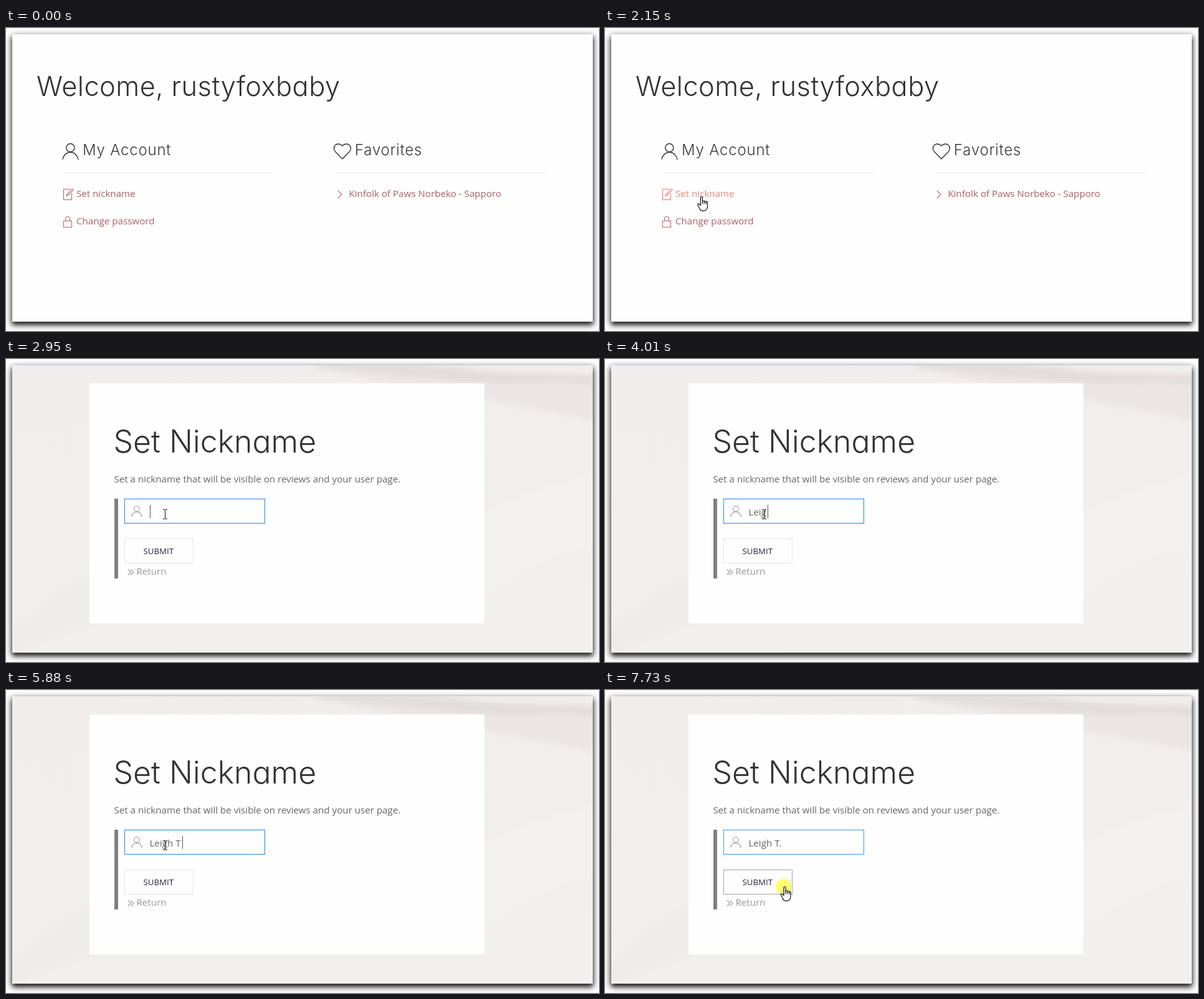
These frames come from a looping animation (952 by 486 pixels, 8000 ms). An HTML page:

```html
<!DOCTYPE html>
<html lang="en">
<head>
<meta charset="utf-8">
<title>Set nickname</title>
<style>
  html, body { margin: 0; width: 100%; height: 100%; overflow: hidden; background: #fff; }
  .frame {
    position: absolute; left: 10px; top: 10px; width: 932px; height: 461px; background: #fefefe;
    box-shadow: 0 4px 10px 1px rgba(0, 0, 0, .78), 0 5px 6px -1px rgba(0, 0, 0, .5);
  }
  svg { position: absolute; left: 0; top: 0; display: block; }
  text { font: 15.15px "Open Sans", "Noto Sans", sans-serif; fill: #666; white-space: pre; }
  .title {
    font: 300 50px Inter, sans-serif; font-optical-sizing: none;
    font-feature-settings: "cv11"; fill: #333;
  }
  .title.small { font-size: 43.5px; letter-spacing: .4px; }
  .section {
    font: 350 24px Inter, sans-serif; font-optical-sizing: none;
    letter-spacing: .8px; fill: #3a3a3a;
  }
  .icon { fill: none; stroke: #333; stroke-width: 1.1; }
  .big { stroke-width: .95; }
  .link text { fill: #a85f66; }
  .link .icon { stroke: #b8646c; }
  .link.hover text { fill: #ea8585; }
  .link.hover .icon { stroke: #ea7c7c; }
  .muted { fill: #999; }
  .icon.muted { fill: none; stroke: #999; }
  .rule { fill: #e5e5e5; }
  .box { fill: #fefefe; stroke: #e5e5e5; }
  .button { font-size: 13.3px; fill: #2b2535; }
</style>
</head>
<body>
<div class="frame"></div>
<svg width="952" height="486">
  <defs>
    <g id="user">
      <circle cx="9.9" cy="6.4" r="4.4"/>
      <path d="M1.5 19C2.3 14.5 5.8 11.2 10 11.2S17.7 14.6 18.5 19.2"/>
    </g>
    <path id="heart" d="M10 4S8.1 2 5.74 2 1 3.55 1 6.73c0 2.11 1.67 3.71 1.67 3.71L10 18l7.33-7.56S19 8.84 19 6.73C19 3.55 16.62 2 14.26 2S10 4 10 4Z"/>
    <path id="edit" d="M18.65 1.68a1.2 1.2 0 0 0-1.67 0L8.92 9.76 8 12.33l2.55-.92 8.1-8.07a1.2 1.2 0 0 0 0-1.66ZM16.5 8.5v10h-13v-17h10.7"/>
    <path id="lock" d="M3.5 8.5h13v10h-13ZM6.5 8V4.88a3.5 3.4 0 0 1 7 0V8"/>
    <path id="chevron" d="M7 4l6 6-6 6"/>

    <path id="arrow" d="M.5.8v15.4l3.6-3.5 2.4 5.6 2.4-1-2.4-5.5h5Z" fill="#fff" stroke="#000"/>
    <path id="hand" d="M5.5 14.5V2a1.5 1.5 0 0 1 3 0v6q0-1 1.4-1t1.5 1.2q.3-.7 1.4-.7t1.4 1.2q.3-.5 1-.5t1.3 1.5V16c0 4.2-2.4 7.3-5.8 7.3H9c-2.5 0-4.3-1.5-5.3-4L.9 13.7c-.7-1.5.9-2.5 2.1-1.4ZM8.5 8v4.2M11.4 8.5v3.7M14.2 9v3.4" fill="#fff" stroke="#0c0c16" stroke-width="1.2" stroke-linejoin="round"/>
    <path id="beam" d="M0 .5h3m1 0h3M0 15.5h3m1 0h3M3.5 1v14" fill="none" stroke="#111"/>

    <linearGradient id="paper" x2=".3" y2="1">
      <stop offset="0" stop-color="#f1edec"/>
      <stop offset=".5" stop-color="#f1eeed"/>
      <stop offset="1" stop-color="#f1f0ef"/>
    </linearGradient>
    <filter id="soft" x="-20%" y="-50%" width="140%" height="200%"><feGaussianBlur stdDeviation="5"/></filter>
    <clipPath id="inside"><rect x="10" y="10" width="932" height="461"/></clipPath>
  </defs>

  <g id="account">
    <text class="title small" x="49" y="109">Welcome, rustyfoxbaby</text>
    <use class="icon big" href="#user" transform="translate(88.5 182.5) scale(1.5)"/>
    <text class="section" x="123" y="204">My Account</text>
    <rect class="rule" x="89" y="232" width="342" height="1"/>
    <g class="link" id="nickLink">
      <use class="icon" href="#edit" x="89" y="257"/>
      <text x="113" y="271">Set nickname</text>
    </g>
    <g class="link">
      <use class="icon" href="#lock" x="89" y="301"/>
      <text x="113" y="315">Change password</text>
    </g>
    <use class="icon big" href="#heart" transform="translate(525 183) scale(1.5)"/>
    <text class="section" x="560" y="204">Favorites</text>
    <rect class="rule" x="526" y="232" width="342" height="1"/>
    <g class="link">
      <use class="icon" href="#chevron" x="526" y="257"/>
      <text x="550.5" y="271">Kinfolk of Paws Norbeko - Sapporo</text>
    </g>
  </g>

  <g id="nickname">
    <g id="backdrop" clip-path="url(#inside)">
      <rect x="10" y="10" width="932" height="461" fill="url(#paper)"/>
      <g filter="url(#soft)">
        <path d="M480 8C600 40 760 62 950 100V0H480Z" fill="#ebe6e3"/>
        <path d="M500 14C620 22 700 34 780 38S900 30 950 44V26C820 24 660 8 500 6Z" fill="#e2dcd9"/>
        <path d="M700 8C780 28 860 20 950 26V6Z" fill="#f1eeec"/>
        <path d="M760 250C830 215 890 195 950 185V300C880 310 820 340 760 390Z" fill="#f3f1f0"/>
        <path d="M0 440C50 400 90 360 140 345V424C90 440 50 460 0 476Z" fill="#eeeceb"/>
      </g>
      <rect x="134" y="39" width="634" height="385" fill="#fefefe"/>
    </g>
    <text class="title" x="172.5" y="150">Set Nickname</text>
    <text x="173.5" y="198">Set a nickname that will be visible on reviews and your user page.</text>
    <rect x="174" y="224" width="6" height="128" fill="#808080"/>
    <rect class="box" id="field" x="190.5" y="224.5" width="225" height="39"/>
    <use class="icon muted" href="#user" x="200" y="234"/>
    <text id="typed" x="230.5" y="251"></text>
    <rect id="caret" y="234" width="1" height="21" fill="#555"/>
    <rect class="box" id="submit" x="190.5" y="288.5" width="110" height="39"/>
    <text class="button" x="220.5" y="313">SUBMIT</text>
    <path class="icon muted" d="M196 337.5l4.5 4.5-4.5 4.5M200.5 337.5l4.5 4.5-4.5 4.5"/>
    <text class="muted" x="209.5" y="346">Return</text>
  </g>

  <circle id="click" cx="287" cy="315" r="12.5" fill="#ffff3c" fill-opacity=".75"/>
  <use id="cursor"/>
</svg>
<script>
const LOOP = 8000;
const NAME = 'Leigh T.';
const caretX = [231, 239, 247, 254, 261, 270, 274, 283, 287]; // by typed letters

// Each step keeps the values of the steps before it.
const steps = [
  [0, { page: 'account', cursor: null, typed: 0, caret: false }],
  [270, { cursor: ['arrow', 452, 300] }],
  [540, { cursor: ['arrow', 323, 128] }],
  [800, { cursor: ['arrow', 160, 153] }],
  [1070, { cursor: ['beam', 259, 107] }],
  [1340, { cursor: ['beam', 493, 98] }],
  [1610, { cursor: ['arrow', 332, 126] }],
  [1880, { cursor: ['arrow', 154, 229] }],
  [2150, { cursor: ['hand', 148, 270], linkHover: true }],
  [2690, { page: 'nickname' }],
  [2950, { backdrop: true, field: '#1e87f0', cursor: ['beam', 252, 241], caret: true }],
  [3210, { caret: false }],
  [3480, { typed: 1, caret: true }],
  [3750, { typed: 2 }],
  [4010, { typed: 4 }],
  [4280, { typed: 5 }],
  [4810, { caret: false }],
  [5080, { typed: 6, caret: true }],
  [5610, { caret: false }],
  [5880, { typed: 7, caret: true }],
  [6140, { typed: 8 }],
  [6940, { cursor: ['beam', 272, 252], caret: false }],
  [7210, { cursor: ['hand', 286, 320] }],
  [7470, { cursor: ['hand', 285.5, 322], caret: true }],
  [7730, { cursor: ['hand', 281.5, 315], caret: false, field: '#3f97e8', submit: '#a3a3a3', click: true }]
];

const $ = id => document.getElementById(id);
const show = (id, on) => { $(id).style.display = on ? '' : 'none'; };

function draw(time) {
  const state = Object.assign({}, ...steps.filter(([at]) => at <= time).map(([, change]) => change));
  show('account', state.page === 'account');
  show('nickname', state.page === 'nickname');
  show('backdrop', state.backdrop);
  show('caret', state.caret);
  show('click', state.click);
  show('cursor', state.cursor);
  $('nickLink').classList.toggle('hover', !!state.linkHover);
  $('field').style.stroke = state.field || '';
  $('submit').style.stroke = state.submit || '';
  $('typed').textContent = NAME.slice(0, state.typed);
  $('caret').setAttribute('x', caretX[state.typed]);
  if (state.cursor) {
    const [kind, x, y] = state.cursor;
    $('cursor').setAttribute('href', '#' + kind);
    $('cursor').setAttribute('transform', `translate(${x} ${y})`);
  }
}

const start = performance.now();
function tick() {
  draw((performance.now() - start) % LOOP);
  requestAnimationFrame(tick);
}
tick();
</script>
</body>
</html>
```
